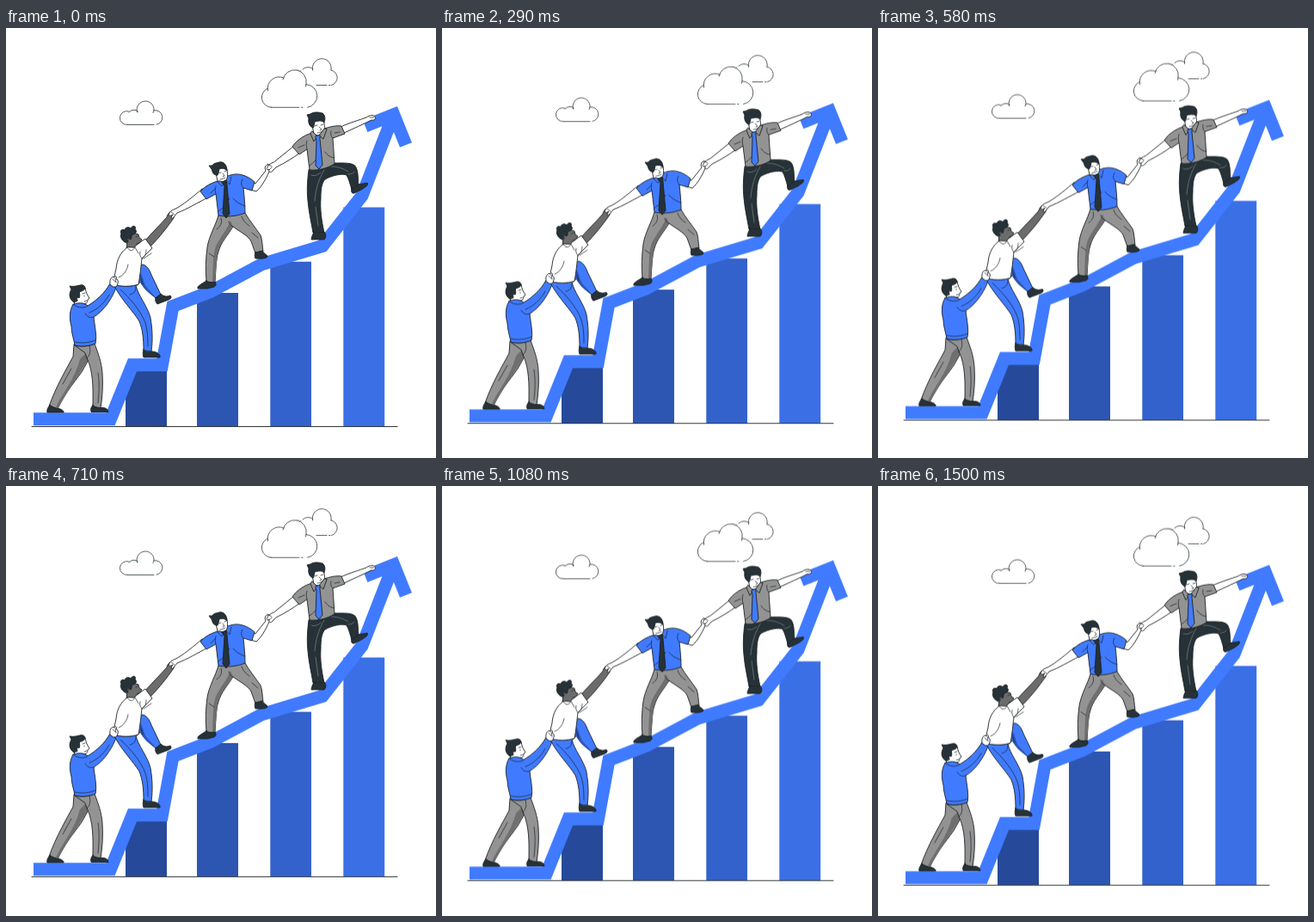
An HTML page for the animation above (1.54 s loop, 500 by 500 pixels).

```html
<!DOCTYPE html>
<html lang="en">
<head>
<meta charset="utf-8">
<title>Climbing the chart</title>
<style>
html, body { margin: 0; width: 100%; height: 100%; overflow: hidden; background: #fff; }
svg { display: block; width: 100vw; height: 100vh; }
path { stroke: #1c2225; stroke-width: .9; stroke-linejoin: round; stroke-linecap: round; fill: none; }
.white { fill: #fff; }
.blue { fill: #407bff; }
.grey { fill: #939393; }
.shade { fill: #6f6f6f; stroke: none; }
.deep { fill: #2d56b3; stroke: none; }
.skin { fill: #6c6c6c; }
.dark { fill: #263238; }
.seam { stroke: #8a9499; stroke-width: .6; }
.thin { stroke-width: .7; }
.trend path { stroke: #407bff; stroke-width: 15; stroke-linejoin: miter; stroke-linecap: butt; }
.clouds path { stroke: #3a4448; stroke-width: .85; }
.clouds .white { stroke: none; }
#scene { animation: bob 1540ms -5ms infinite; }
/* rise for 18 steps, sink for 19 */
@keyframes bob {
  0% { transform: translateY(0); animation-timing-function: steps(18); }
  48.648% { transform: translateY(-9.7px); }
  48.649% { transform: translateY(-8.95px); animation-timing-function: steps(19); }
  100% { transform: translateY(1.2px); }
}
</style>
</head>
<body>
<svg viewBox="0 0 500 500">
<g id="scene">
  <g class="clouds">
    <path d="M331 52C334 49 339 48 343 50M345 48A9 9 0 0 1 357 47.500M356.500 49A11 11 0 1 1 378 49M378 49A9 9 0 0 1 378.500 66.500M361 66.500H373M375.500 66.500H377"/>
    <path class="white" d="M308.500 92.300A11.600 11.600 0 0 1 304.500 70A13.500 13.500 0 0 1 323 58A13.500 13.500 0 0 1 349 65.500A13.500 13.500 0 0 1 351 92.300Z"/>
    <path d="M308.500 92.300A11.600 11.600 0 0 1 304.500 70M304.500 73A13.500 13.500 0 0 1 323 58M322 60A13.700 13.700 0 0 1 349 65L348.500 68M349 65.500A13.500 13.500 0 0 1 350.500 92.300M308 92.300H341M343.500 92.300H345"/>
    <path d="M141.500 112.500A8 8 0 1 1 143 97M143 98A7 7 0 0 1 153.500 97M152.500 98A10 10 0 1 1 172 96L171 98.500M172 95.800A8.300 8.300 0 0 1 175 112.300M141.500 112.500H172"/>
  </g>

  <path d="M30 463.500H455"/>
  <rect x="139" y="399" width="48" height="64" fill="#264a99"/>
  <rect x="222" y="308" width="48" height="155" fill="#2d56b3"/>
  <rect x="307.300" y="271.700" width="47.700" height="191.300" fill="#3362cc"/>
  <rect x="392.300" y="208.500" width="47.900" height="254.500" fill="#3a6fe6"/>
  <g class="trend">
    <path d="M32 454.700H121.500L147 391.700H181.500L194 323.500L238 306.500L298 274.500L368 253.500L414 195L449 105"/>
    <path d="M417.600 114L450.800 100.700L465 136"/>
  </g>

  <g id="pusher">
    <path class="grey" d="M79 368L78 382C70 397 58 417 50 440L60 443C66 428 78 414 88 400L97 384L98 370Z"/>
    <path class="shade" d="M86 385L100 371L96 385C82 407 70 425 61 442L58 441C66 423 80 409 86 385Z"/>
    <path class="grey" d="M80 369C88 371 97 370 103 367C107 378 111 388 112 401C113 416 112 430 110 442L101 440C101 424 102 408 97 391L92 378Z"/>
    <path class="thin" d="M97 370C99 377 97 381 94 384M107 401C109 414 108 426 107 436M76 396L66 414"/>
    <path class="dark" d="M51 438.500C54 441 58 442 61 442.500C65 443 68 446 67 447H48C47 444 49 441 51 438.500Z"/>
    <path class="dark" d="M101 438.500C103 441 107 442 110 441.500C115 441 119 443 119 446.500H99C98 443 99 441 101 438.500Z"/>
    <path class="white" d="M79 323L80 315L87 305L92 302C93 307 94 310 97 314L95 316C95 320 92 322 88 320L88 324Z"/>
    <path class="thin" d="M89 309L92 308M91 311V312M91 318L94 317"/>
    <path class="dark" d="M79 319C73 315 73 309 76 304L74 300C78 301 82 300 86 299C90 298 92 300 92 303C90 306 87 306 85 307C86 310 86 312 85 314C83 312 82 314 83 317Z"/>
    <path class="blue" d="M78 321.500C73 329 74 340 76 347C76 355 79 362 80 369C88 371 97 370 104 367C106 358 103 346 102 336C111 331 122 318 128 302L121 297C115 308 105 317 95 323C90 319 84 319 78 321.500Z"/>
    <path class="thin" d="M79 322C84 326 92 326 95 323M102 336C97 338 94 335 92 332M97 331C107 327 115 319 120 310M80 365C88 367 97 366 104 363"/>
  </g>

  <g id="climber">
    <path class="blue" d="M152 299C150 288 152 277 158 275C163 275 167 281 169 287L180 310L174 314C168 309 161 304 157 295Z"/>
    <path class="deep" d="M155 284C160 287 159 296 164 302L174 313C166 309 160 303 156 296Z"/>
    <path class="blue" d="M125 298C131 300 143 301 151 299C153 310 165 324 168 337C170 349 171 361 169 376L160 375C160 362 159 351 155 341C147 328 133 315 125 298Z"/>
    <path class="thin" d="M133 304C144 314 157 329 162 343C165 353 165 363 165 370M157 291L159 298M144 310C149 309 151 306 151 301"/>
    <path class="dark" d="M174 314L180 309C183 312 187 313 191 311C193 313 192 315 189 316L176 321C174 319 173 316 174 314Z"/>
    <path class="dark" d="M160 374C163 377 166 377 169 376C174 376 180 379 179 383H160C159 380 159 377 160 374Z"/>
    <path class="skin" d="M161 248C169 239 179 229 187 220C188 215 192 212 196 214L195 221C188 231 179 243 166 256Z"/>
    <path class="skin" d="M140 257L141 248L148 238L154 240L155 244L158 246L156 249C156 252 154 255 150 254L149 259Z"/>
    <path class="white" d="M141 255C133 261 129 269 128 280L124 298C134 301 146 301 154 298C156 288 157 276 158 268L170 256L162 245C158 248 153 251 149 255Z"/>
    <path class="thin" d="M141 255C143 259 147 261 150 255M150 255L154 262M158 268C156 266 155 263 156 260M158 268C162 266 163 262 163 258M131 290C137 288 141 281 142 275M169 262L160 268"/>
    <path class="dark" d="M140 250C135 248 132 243 134 239C132 236 135 233 138 235C139 231 143 231 145 233C148 228 152 231 150 234C153 236 151 239 148 240C145 240 147 244 145 246C142 243 140 246 142 248Z"/>
    <path class="thin" d="M151 243L153 242M152 251L155 250"/>
    <path class="white" d="M121 298C120 292 123 288 126 290C128 287 129 290 128 292C131 292 131 297 128 301L125 301Z"/>
    <path class="thin" d="M124 292L127 295M127 291L128 296"/>
  </g>

  <g id="helper">
    <path class="grey" d="M247 218C244 229 236 242 234 255C232 269 232 282 233 295L243 296C244 282 244 269 247 260C250 249 258 241 264 231C272 237 281 241 285 248L290 262L299 260C298 253 298 246 296 241C290 232 283 224 278 215Z"/>
    <path class="shade" d="M261 224L264 231C258 241 249 250 246 261L243 295H240C241 281 240 265 244 254C249 243 257 235 261 224Z"/>
    <path class="thin" d="M250 221C252 227 249 231 245 234M274 219C276 225 280 228 283 230M264 231C261 230 260 228 259 225M286 238L293 244M236 262L242 266"/>
    <path class="dark" d="M233 294C237 297 240 296 243 295C245 298 244 300 242 301L234 303H223C222 300 227 298 233 294Z"/>
    <path class="dark" d="M290 261L298 259C300 263 304 263 304 266C301 269 295 268 290 268C289 266 289 263 290 261Z"/>
    <path class="white" d="M228 187C219 195 209 203 201 208C197 211 192 211 190 215C188 219 191 219 194 217C191 221 192 223 195 220L199 215C210 211 223 203 235 197Z"/>
    <path class="white" d="M283 178L290 181L302 166C300 162 302 159 305 159C308 160 308 164 306 167C302 176 297 185 291 190L281 187Z"/>
    <path class="blue" d="M246 178C239 180 231 184 226 190L233 199L244 193L247 218C258 220 268 219 278 215C278 205 277 195 276 186L286 189L289 179C285 175 279 172 275 171C269 169 263 170 258 172Z"/>
    <path class="thin" d="M244 193C243 190 243 187 244 184M276 186C273 183 273 179 275 176M247 213C253 210 257 203 260 198M278 207C272 205 267 202 264 198M238 192L243 187"/>
    <path class="white" d="M246 178L244 169L247 164L256 162C258 167 258 172 257 175C256 178 252 180 249 178Z"/>
    <path class="thin" d="M246 179L251 184L256 177L260 182L262 173M247 169L250 168M254 167L256 166M252 169L254 172L252 173M249 176C251 176 253 175 255 174"/>
    <path class="dark" d="M251 179L256 177L257 182L260 216L256 221L252 216L254 184Z"/>
    <path class="dark" d="M244 171C240 170 240 166 239 164L236 160L240 160C241 157 245 157 248 156C253 155 257 159 257 166C254 163 251 163 248 163C248 166 247 168 246 171Z"/>
  </g>

  <g id="leader">
    <path class="dark" d="M352 165C350 180 350 191 351 201C352 214 355 226 357 238L370 238C367 224 365 211 366 198C366 188 367 180 371 176C380 171 391 169 396 171C399 176 400 182 402 188L410 183C409 176 410 168 407 162C405 156 392 157 382 157Z"/>
    <path class="seam" d="M370 165C364 175 360 187 359 201M355 171C359 173 364 170 366 168M378 161C385 161 392 163 398 167M398 170C402 170 404 169 405 167M360 208L363 230"/>
    <path class="dark" d="M358 237C362 240 366 238 370 237C373 240 372 244 370 246H355C355 243 357 240 358 237Z"/>
    <path class="dark" d="M402 187C405 187 407 185 409 182C412 181 417 181 420 180C422 183 417 185 415 187L405 192C402 193 401 190 402 187Z"/>
    <path class="white" d="M335 137L314 154C311 157 306 157 304 162C302 164 304 166 306 164C305 168 308 169 310 166L314 162C324 157 334 151 342 145Z"/>
    <path class="thin" d="M304 158L309 161M306 165L309 162M192 214L196 217"/>
    <path class="white" d="M389 115C400 110 411 107 419 104C423 101 427 101 429 103C431 105 428 108 425 107C415 112 404 117 393 122Z"/>
    <path class="thin" d="M423 104L428 104"/>
    <path class="grey" d="M356 122C348 124 338 130 333 138L341 147L350 141L353 165C363 166 374 163 382 158L380 128L394 123L390 114C384 113 376 115 370 117Z"/>
    <path class="thin" d="M350 141C349 137 349 134 350 131M380 128C378 126 377 123 378 120M353 160C358 157 361 152 364 149M381 151C376 150 373 147 371 144M340 139L347 136M382 122L388 121"/>
    <path class="white" d="M358 123L356 113L359 107L369 107C371 113 371 119 369 122C367 126 362 126 358 123Z"/>
    <path class="grey" d="M356 120L362 126L358 132L354 123ZM370 117L364 125L369 129L373 118Z"/>
    <path class="thin" d="M359 114L362 113M366 113L369 112M364 115L367 118L365 119M362 122C364 122 366 121 368 120"/>
    <path class="blue" d="M360 126L365 124L365 129L368 159L364 164L360 160L361 131Z"/>
    <path class="dark" d="M357 116C353 115 351 110 352 105L350 101L354 100C358 97 364 98 368 99C372 102 371 107 370 110C367 107 363 108 359 109L358 114Z"/>
  </g>
</g>
</svg>
</body>
</html>
```
